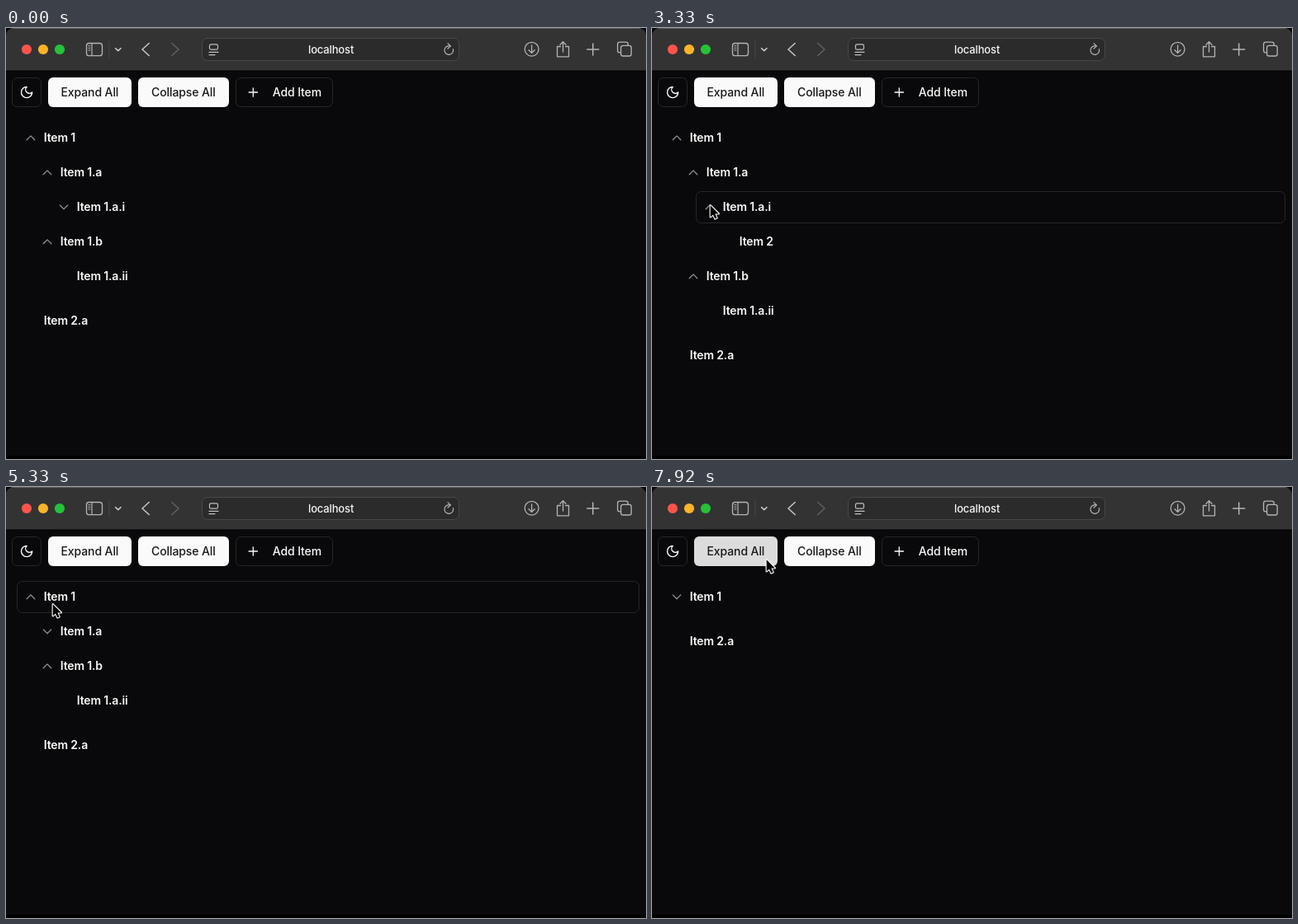
Write an HTML page with a canvas that moves like this. It is 775 by 523 pixels and loops after 8000 ms.

```html
<!DOCTYPE html>
<html lang="en">
<head>
<meta charset="utf-8">
<title>Tree view</title>
<style>
  html, body { margin: 0; width: 100%; height: 100%; overflow: hidden; background: #000; }
  canvas { display: block; width: 775px; height: 523px; }
</style>
</head>
<body>
<canvas id="stage"></canvas>
<script>
const W = 775, H = 523, LOOP = 8000, FPS = 12;
const canvas = document.getElementById('stage');
const ctx = canvas.getContext('2d');
const dpr = window.devicePixelRatio || 1;
canvas.width = W * dpr;
canvas.height = H * dpr;

const BG = '#09090b', BORDER = '#27272a', LIGHT = '#fafafa', ICON = '#b4b4b4';

const TREE = [
  { label: 'Item 1', children: [
    { label: 'Item 1.a', children: [
      { label: 'Item 1.a.i', children: [{ label: 'Item 2' }] }
    ] },
    { label: 'Item 1.b', children: [{ label: 'Item 1.a.ii' }] }
  ] },
  { label: 'Item 2.a' }
];

// Time and the closed branch from then on
const STATES = [
  [0, 'Item 1.a.i'], [3330, ''], [4080, 'Item 1.a.i'], [4830, 'Item 1.a'],
  [5660, 'Item 1'], [6660, ''], [7330, 'Item 1']
];

// Cursor path: time, x, y
const PATH = [
  [330, 110, 276], [500, 96, 272], [583, 96, 272], [1417, 78, 214],
  [2750, 78, 214], [3000, 70, 214], [4083, 70, 214], [4500, 51, 174],
  [4917, 51, 174], [5333, 56, 141], [5417, 48, 136], [5750, 48, 136],
  [6250, 131, 81], [6667, 131, 81], [6917, 221, 81], [7000, 223, 83],
  [7333, 223, 83], [7917, 138, 87]
];

// Mouse held down: start, end
const PRESSES = [[3080, 3330], [3830, 4080], [4660, 4830], [5490, 5660], [6490, 6660], [7080, 7330]];

const BUTTONS = [
  { label: 'Expand All', x: 51, w: 101, textX: 66.5 },
  { label: 'Collapse All', x: 160, w: 110, textX: 176 }
];

function box(x, y, w, h, r, fill, stroke, width = 1) {
  ctx.beginPath();
  ctx.roundRect(x, y, w, h, r);
  if (fill) { ctx.fillStyle = fill; ctx.fill(); }
  if (stroke) { ctx.strokeStyle = stroke; ctx.lineWidth = width; ctx.stroke(); }
}

function line(points, color, width = 1.4) {
  ctx.beginPath();
  points.forEach(([x, y]) => ctx.lineTo(x, y));
  ctx.strokeStyle = color;
  ctx.lineWidth = width;
  ctx.stroke();
}

function arc(x, y, r, color, width, from = 0, to = Math.PI * 2) {
  ctx.beginPath();
  ctx.arc(x, y, r, from, to);
  ctx.strokeStyle = color;
  ctx.lineWidth = width;
  ctx.stroke();
}

function dot(x, y, r, color) {
  ctx.beginPath();
  ctx.arc(x, y, r, 0, Math.PI * 2);
  ctx.fillStyle = color;
  ctx.fill();
}

function text(str, x, y, color, weight = 500, size = 14, spacing = -0.1) {
  ctx.font = `${weight} ${size}px Inter, sans-serif`;
  ctx.letterSpacing = spacing + 'px';
  ctx.fillStyle = color;
  ctx.fillText(str, x, y);
}

function plus(x, y, r, color, width) {
  line([[x - r, y], [x + r, y]], color, width);
  line([[x, y - r], [x, y + r]], color, width);
}

function drawToolbar() {
  ctx.fillStyle = '#333334';
  ctx.fillRect(0, 0, W, 52);
  ctx.fillStyle = '#5c5c5d';
  ctx.fillRect(0, 0, W, 1);
  ctx.fillStyle = '#000';
  ctx.fillRect(0, 51.5, W, 1);

  ['#ff544c', '#fdb427', '#25c338'].forEach((c, i) => dot(25 + i * 20, 26, 6.1, c));

  // Sidebar, back and forward
  box(97.5, 18.5, 19, 15.2, 3, null, ICON, 1.3);
  line([[104, 18.5], [104, 33.5]], ICON, 1.2);
  [21.7, 24.3, 26.9].forEach(y => line([[99.7, y], [102, y]], ICON, 1));
  line([[125, 16], [125, 36]], '#484849', 1);
  line([[132.6, 24.6], [135.8, 27.6], [139, 24.6]], '#c4c4c4', 1.5);
  line([[173.2, 18.5], [165, 26], [173.2, 33.5]], '#c4c4c4', 1.6);
  line([[200.8, 18.5], [209, 26], [200.8, 33.5]], '#5f5f60', 1.6);

  // Address field
  box(237.5, 12.5, 311, 27, 6.5, '#2b2b2c', '#48484a');
  box(246.5, 19.8, 10, 6.4, 1.8, null, '#c0c0c0', 1.2);
  line([[246, 29.4], [257, 29.4]], '#c0c0c0', 1.2);
  line([[246, 32.6], [253, 32.6]], '#c0c0c0', 1.2);
  text('localhost', 366, 31, '#f4f4f4', 500, 13, -0.15);
  arc(536.3, 27, 5.3, ICON, 1.2, -0.25, Math.PI * 1.6);
  line([[535, 18.6], [538.4, 21.9], [535, 25]], ICON, 1.2);

  // Download, share, new tab, overview
  arc(636.6, 25.7, 8.4, ICON, 1.3);
  line([[636.6, 21], [636.6, 30]], ICON, 1.3);
  line([[633, 26.8], [636.6, 30.3], [640.2, 26.8]], ICON, 1.3);
  line([[671.5, 22.5], [667.5, 22.5], [667.5, 34.8], [681.5, 34.8], [681.5, 22.5], [677.5, 22.5]], ICON, 1.3);
  line([[674.5, 29], [674.5, 17]], ICON, 1.3);
  line([[671, 20.2], [674.5, 16.7], [678, 20.2]], ICON, 1.3);
  plus(710.7, 26, 7, ICON, 1.5);
  box(740.6, 17.2, 12.6, 12.6, 2.6, null, ICON, 1.3);
  box(744.6, 21.4, 12.6, 12.6, 2.6, '#333334', ICON, 1.3);
}

const MOON = new Path2D('M12 3a6 6 0 0 0 9 9 9 9 0 1 1-9-9Z');

function drawButtons(cursor) {
  box(7.5, 60.5, 35, 35, 6, BG, BORDER);
  ctx.save();
  ctx.translate(16.3, 69.2);
  ctx.scale(0.733, 0.733);
  ctx.strokeStyle = LIGHT;
  ctx.lineWidth = 1.9;
  ctx.stroke(MOON);
  ctx.restore();

  for (const b of BUTTONS) {
    const over = cursor && inside(cursor, b.x, 60, b.w, 36);
    box(b.x, 60, b.w, 36, 6, over ? '#dcdcdc' : LIGHT);
    text(b.label, b.textX, 83, '#18181b');
  }
  box(278.5, 60.5, 117, 35, 6, BG, BORDER);
  plus(299.3, 78, 5.2, LIGHT, 1.3);
  text('Add Item', 322.7, 83, LIGHT);
}

function inside(p, x, y, w, h) {
  return p.x >= x && p.x < x + w && p.y >= y && p.y < y + h;
}

function visibleRows(closed) {
  const rows = [];
  let y = 114;
  const walk = (nodes, depth) => nodes.forEach(node => {
    const open = node.label !== closed;
    rows.push({ label: node.label, x: 13 + depth * 20, y, branch: !!node.children, open });
    y += 42;
    if (node.children && open) walk(node.children, depth + 1);
    if (depth === 0) y += 11.5;
  });
  walk(TREE, 0);
  return rows;
}

function drawTree(closed, cursor) {
  for (const r of visibleRows(closed)) {
    const w = 767 - r.x;
    if (cursor && inside(cursor, r.x, r.y, w, 39)) {
      box(r.x + 0.5, r.y + 0.5, w - 1, 38, 6, null, BORDER);
    }
    if (r.branch) {
      const cx = r.x + 17, cy = r.y + 19.3, d = r.open ? 2.4 : -2.4;
      line([[cx - 4.8, cy + d], [cx, cy - d], [cx + 4.8, cy + d]], '#8f8f93', 1.3);
    }
    text(r.label, r.x + 32.7, r.y + 24, LIGHT, 600, 14, -0.15);
  }
}

function cursorAt(t) {
  if (t < PATH[0][0]) return null;
  const i = PATH.findIndex(k => k[0] > t);
  if (i < 0) {
    const [, x, y] = PATH[PATH.length - 1];
    return { x, y };
  }
  const [t0, x0, y0] = PATH[i - 1], [t1, x1, y1] = PATH[i];
  const p = (t - t0) / (t1 - t0), e = p * p * (3 - 2 * p);
  return { x: x0 + (x1 - x0) * e, y: y0 + (y1 - y0) * e };
}

const ARROW = new Path2D('M0 0V14.2L3.3 11.2 5.6 16.4 8 15.4 5.7 10.2H10.2Z');

function drawCursor({ x, y }, pressed) {
  if (pressed) {
    arc(x + 0.3, y + 1, 20.4, '#0a0a0b', 4);
    arc(x + 0.3, y + 1, 22, '#f0f0f0', 1.2);
    arc(x + 0.3, y + 1, 18.4, '#f0f0f0', 1.2);
  }
  ctx.save();
  ctx.translate(x + 0.7, y + 1.2);
  ctx.strokeStyle = '#fff';
  ctx.lineWidth = 2.2;
  ctx.lineJoin = 'round';
  ctx.stroke(ARROW);
  ctx.fillStyle = '#000';
  ctx.fill(ARROW);
  ctx.restore();
}

function draw(time) {
  const t = Math.floor((time % LOOP + 5) * FPS / 1000) * 1000 / FPS;
  const closed = STATES.filter(s => s[0] <= t).pop()[1];
  const cursor = cursorAt(t);
  const pressed = PRESSES.some(([a, b]) => t >= a && t < b);

  ctx.setTransform(dpr, 0, 0, dpr, 0, 0);
  ctx.fillStyle = '#000';
  ctx.fillRect(0, 0, W, H);
  ctx.save();
  ctx.beginPath();
  ctx.roundRect(0, 0, W, 519, [9, 9, 0, 0]);
  ctx.clip();
  ctx.lineCap = 'round';
  ctx.lineJoin = 'round';
  ctx.fillStyle = BG;
  ctx.fillRect(0, 0, W, H);
  drawToolbar();
  drawButtons(cursor);
  drawTree(closed, cursor);
  if (cursor) drawCursor(cursor, pressed);
  ctx.restore();
}

const start = performance.now();
function tick() {
  draw(performance.now() - start);
  requestAnimationFrame(tick);
}
tick();
</script>
</body>
</html>
```
